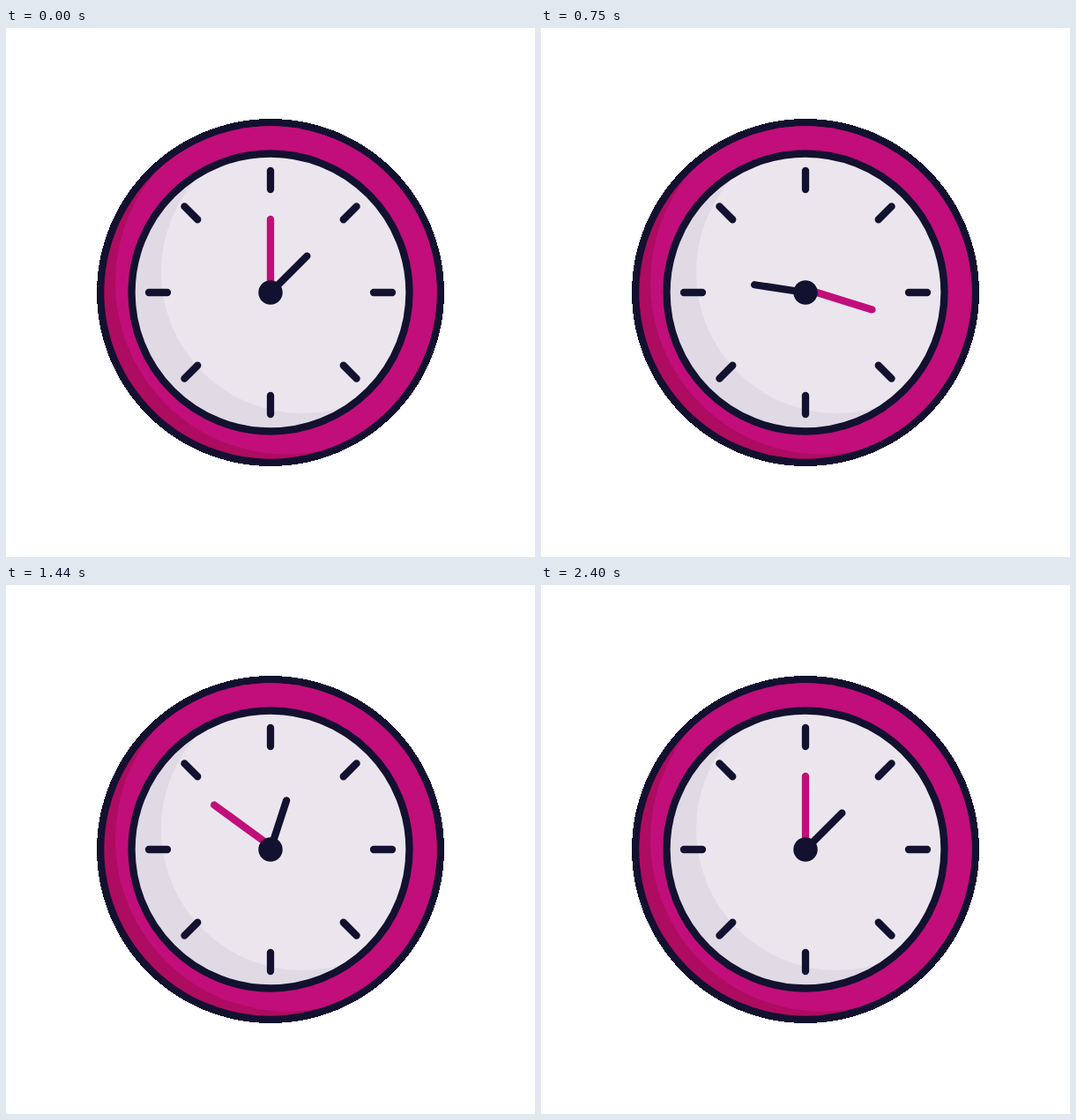
An HTML page for the animation above (4.46 s loop, 600 by 600 pixels).

```html
<!DOCTYPE html>
<html lang="en">
<head>
<meta charset="utf-8">
<title>Clock</title>
<style>
  html, body { margin: 0; width: 100%; height: 100%; overflow: hidden; background: #fff; }
  svg { display: block; width: 100vw; height: 100vh; }
  .hand, .ticks { fill: none; stroke: #12112f; stroke-width: 8.3; stroke-linecap: round; }
  #minute { stroke: #c20e7a; }
</style>
</head>
<body>
<svg viewBox="0 0 600 600">
  <defs>
    <clipPath id="rimClip"><circle cx="300" cy="300" r="188.7"/></clipPath>
    <clipPath id="faceClip"><circle cx="300" cy="300" r="156"/></clipPath>
  </defs>

  <circle cx="300" cy="300" r="197" fill="#12112f" shape-rendering="crispEdges"/>
  <circle cx="300" cy="300" r="188.7" fill="#ad0c61"/>
  <circle cx="319" cy="288.5" r="195" fill="#c20e7a" clip-path="url(#rimClip)"/>

  <circle cx="300" cy="300" r="157.5" fill="#e0dae5"/>
  <circle cx="336" cy="277" r="160" fill="#ebe6ed" clip-path="url(#faceClip)"/>
  <circle cx="300" cy="300" r="157.5" fill="none" stroke="#12112f" stroke-width="8.3"/>

  <g class="ticks" id="ticks"></g>
  <path class="hand" id="minute" d="M300 296V217"/>
  <path class="hand" id="hour" d="M300 300V241.5"/>
  <circle cx="300" cy="300" r="13.7" fill="#12112f"/>
</svg>
<script>
  const LOOP = 4460, SPIN = 2400, STEP = 30;
  const byId = id => document.getElementById(id);
  const minute = byId('minute'), hour = byId('hour');

  for (let a = 0; a < 360; a += 45) {
    const tick = document.createElementNS('http://www.w3.org/2000/svg', 'path');
    tick.setAttribute('d', 'M300 162V183');
    tick.setAttribute('transform', `rotate(${a} 300 300)`);
    byId('ticks').append(tick);
  }

  // cubic-bezier(1/3, 0, 0, 1), solved by bisection
  function ease(x) {
    if (x <= 0 || x >= 1) return x <= 0 ? 0 : 1;
    let lo = 0, hi = 1;
    for (let i = 0; i < 30; i++) {
      const s = (lo + hi) / 2;
      if ((1 - s) ** 2 * s + s ** 3 < x) lo = s; else hi = s;
    }
    return lo * lo * (3 - 2 * lo);
  }

  const turn = (hand, angle, cy) => hand.setAttribute('transform', `rotate(${angle} 300 ${cy})`);

  function draw(ms) {
    const t = Math.floor((ms % LOOP) / STEP) * STEP;
    const p = ease(t / SPIN);
    turn(minute, 720 * p, 296);
    turn(hour, 45 + 360 * p, 300);
  }

  let start;
  function tick(now) {
    start ??= now;
    draw(Math.max(0, now - start));
    requestAnimationFrame(tick);
  }
  draw(0);
  requestAnimationFrame(tick);
</script>
</body>
</html>
```
